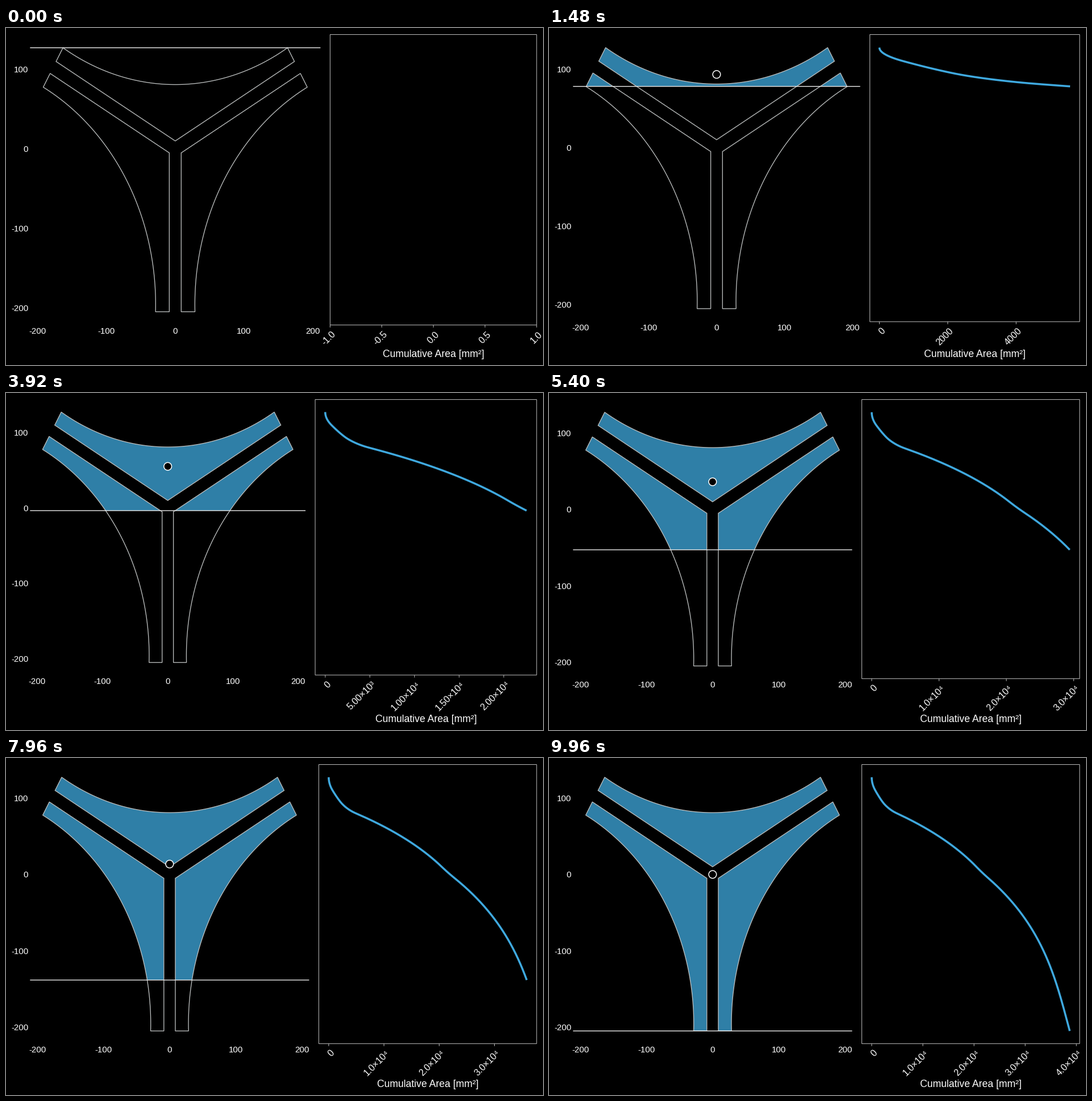
A matplotlib script that plays this animation: 945 by 593 pixels, repeating every 10000 ms.

```python
import math

import numpy as np
import matplotlib.pyplot as plt
from matplotlib.animation import FuncAnimation
from matplotlib.patches import Circle, Polygon

W, H, DPI = 945, 593, 64
PT = 72 / DPI  # points per pixel
FRAMES, INTERVAL = 250, 40

plt.rcParams["font.family"] = ["Liberation Sans", "DejaVu Sans"]
plt.rcParams["path.snap"] = False

LINE_BLUE, FILL_BLUE = "#3fa9df", "#2f7fa7"
EDGE, SPINE, RULE = "#b9bcbc", "#b6b6b6", "#ececec"

# Layout in pixels
TOP, LEFT, RIGHT, GAP = 11.5, 42.3, 933.8, 17.0

# Cross-section in mm
ARM, HALF_GAP, THICK, RADIUS = 205, 10 * math.cos(math.pi / 6), 20, 310.5


def build_pieces():
    """Three equal webs, each bounded by two arms and an arc."""
    along = np.array([math.cos(math.pi / 6), 0.5])
    across = np.array([-0.5, math.cos(math.pi / 6)])
    inner = ARM * along + HALF_GAP * across
    outer = inner + THICK * across
    mid_y = outer[1] + math.sqrt(RADIUS**2 - outer[0] ** 2)
    half = math.asin(outer[0] / RADIUS)
    t = np.linspace(half, -half, 161)
    arc = np.column_stack([RADIUS * np.sin(t), mid_y - RADIUS * np.cos(t)])
    top = np.vstack([[0, 10], inner, arc, inner * [-1, 1]])
    pieces = []
    for turn in (0, 2 * math.pi / 3, 4 * math.pi / 3):
        c, s = math.cos(turn), math.sin(turn)
        pieces.append(top @ np.array([[c, s], [-s, c]]))
    return pieces


def clip_above(points, level):
    kept = []
    for a, b in zip(points, np.roll(points, -1, axis=0)):
        if a[1] >= level:
            kept.append(a)
        if (a[1] >= level) != (b[1] >= level):
            kept.append(a + (b - a) * (level - a[1]) / (b[1] - a[1]))
    return np.array(kept) if len(kept) > 2 else np.zeros((3, 2))


def area_and_moment(points):
    x, y = points.T
    x2, y2 = np.roll(x, -1), np.roll(y, -1)
    cross = x * y2 - x2 * y
    return cross.sum() / 2, ((y + y2) * cross).sum() / 6


PIECES = build_pieces()
Y_HI = max(p[:, 1].max() for p in PIECES)
Y_LO = -ARM
X_MAX = max(p[:, 0].max() for p in PIECES)
Y_SPAN = (Y_HI - Y_LO) * 1.1
Y_TOP = Y_HI + Y_SPAN / 22
X_HALF = X_MAX * 1.1

LEVELS = np.linspace(Y_HI, Y_LO, FRAMES)
FILLS = [[clip_above(p, level) for p in PIECES] for level in LEVELS]
SUMS = np.array([np.sum([area_and_moment(p) for p in fill], axis=0)
                 for fill in FILLS])
AREAS = np.abs(SUMS[:, 0])
AREAS[0] = 0
MOMENTS = SUMS[:, 1] * np.sign(SUMS[:, 0])


def nice_ticks(lo, hi):
    """Wilkinson-style ticks, ideally five of them."""
    span, best, chosen = hi - lo, -1, None
    top = math.ceil(math.log10(span))
    for power in range(top, top - 3, -1):
        for q, nice in ((1, 1), (5, 0.9), (2, 0.7), (2.5, 0.5), (3, 0.2)):
            step = q * 10.0**power
            if (math.ceil(hi / step) - math.floor(lo / step)) * step >= 2 * span:
                continue
            first, last = math.ceil(lo / step), math.floor(hi / step)
            n = last - first + 1
            if not 3 <= n <= 10:
                continue
            fit = max(0, 1 - abs(n - 5) / 5)
            cover = 1.5 * span / ((n - 1) * step)
            score = fit / 4 + 1 / 6 + cover / 3 + nice / 4
            if score > best + 1e-9:
                best, chosen = score, (step, range(first, last + 1))
    step, ids = chosen
    return step, [i * step for i in ids]


def tick_labels(step, values):
    if values[-1] - values[0] > 10000.5:
        digits = 2 if step % 10000 else 1
        labels = []
        for v in values:
            if v == 0:
                labels.append("0")
                continue
            power = int(math.log10(v) + 1e-9)
            labels.append(f"{v / 10**power:.{digits}f}×10{'⁰¹²³⁴'[power]}")
        return labels
    digits = 0
    while abs(round(step, digits) - step) > 1e-9:
        digits += 1
    return [f"{v:.{digits}f}" for v in values]


def text_width(label):
    """Approximate width in em."""
    special = {".": 0.278, "-": 0.333, "×": 0.584, "³": 0.37, "⁴": 0.37}
    return sum(special.get(ch, 0.556) for ch in label)


fig = plt.figure(figsize=(W / DPI, H / DPI), dpi=DPI, facecolor="black")
ax = fig.add_axes([0, 0, 1, 1])
ax.set_xlim(0, W)
ax.set_ylim(H, 0)
ax.axis("off")


def new_line(color, width, z):
    line, = ax.plot([], [], color=color, lw=width * PT, zorder=z,
                    solid_capstyle="butt", solid_joinstyle="miter")
    return line


def new_text(size, **kw):
    return ax.text(0, 0, "", color="white", fontsize=size * PT, **kw)


def new_polygon(z, **kw):
    return ax.add_patch(Polygon(np.zeros((3, 2)), closed=True, zorder=z, **kw))


fills = [new_polygon(1, fc=FILL_BLUE, ec="none") for _ in PIECES]
outlines = [new_polygon(2, fc="none", ec=EDGE, lw=1.35 * PT) for _ in PIECES]
rule = new_line(RULE, 1.4, 3)
dot = ax.add_patch(Circle((0, 0), 6.8, fc="black", ec="white", lw=1.5 * PT, zorder=4))
frame_box = new_polygon(2, fc="none", ec=SPINE, lw=1.05 * PT)
tick_marks = new_line(SPINE, 1.05, 2)
curve = new_line(LINE_BLUE, 3.5, 3)

X_VALUES, Y_VALUES = range(-200, 201, 100), range(-200, 101, 100)
x_texts = [new_text(15, ha="center", va="baseline") for _ in X_VALUES]
y_texts = [new_text(15, ha="right", va="baseline") for _ in Y_VALUES]
area_texts = [new_text(16, ha="right", va="baseline", rotation=45,
                       rotation_mode="anchor") for _ in range(10)]
title = new_text(17.6, ha="center", va="baseline")
title.set_text("Cumulative Area [mm²]")


def draw(k):
    total = AREAS[k]
    if k == 0:
        lo, hi = -1.0, 1.0
        step, values = 0.5, [-1, -0.5, 0, 0.5, 1]
    else:
        lo, hi = -0.05 * total, 1.05 * total
        step, values = nice_ticks(lo, hi)
    labels = tick_labels(step, values)

    # Longer rotated labels push the axes' bottom edge up.
    bottom = 542.4 - 11.5 * max(map(text_width, labels))
    side = bottom - TOP
    box_left = LEFT + side + GAP

    def px(x):
        return LEFT + (x + X_HALF) / (2 * X_HALF) * side

    def py(y):
        return TOP + (Y_TOP - y) / Y_SPAN * side

    def pa(a):
        return box_left + (a - lo) / (hi - lo) * (RIGHT - box_left)

    def to_pixels(points):
        return np.column_stack([px(points[:, 0]), py(points[:, 1])])

    for patch, points in zip(outlines, PIECES):
        patch.set_xy(to_pixels(points))
    for patch, points in zip(fills, FILLS[k]):
        patch.set_xy(to_pixels(points))
        patch.set_visible(k > 0)

    level = py(LEVELS[k])
    rule.set_data([LEFT, LEFT + side], [level, level])
    dot.set_visible(k > 0)
    if k > 0:
        dot.center = (px(0), py(MOMENTS[k] / total))

    for text, v in zip(x_texts, X_VALUES):
        text.set_text(str(v))
        text.set_position((px(v), bottom + 15.3))
    for text, v in zip(y_texts, Y_VALUES):
        text.set_text(str(v))
        text.set_position((39.3, py(v) + 5.3))

    frame_box.set_xy([(box_left, TOP), (RIGHT, TOP), (RIGHT, bottom), (box_left, bottom)])
    marks_x, marks_y = [], []
    for text in area_texts:
        text.set_text("")
    for text, v, label in zip(area_texts, values, labels):
        x = pa(v)
        marks_x += [x, x, np.nan]
        marks_y += [bottom, bottom + 4.4, np.nan]
        text.set_text(label)
        text.set_position((x + 10.8, bottom + 17.2))
    tick_marks.set_data(marks_x, marks_y)
    title.set_position(((box_left + RIGHT) / 2, 578.8))

    if k > 0:
        curve.set_data(pa(AREAS[:k + 1]), py(LEVELS[:k + 1]))
    else:
        curve.set_data([], [])
    return []


anim = FuncAnimation(fig, draw, frames=FRAMES, interval=INTERVAL,
                     init_func=lambda: draw(0), repeat=True, repeat_delay=0)
plt.show()
```
